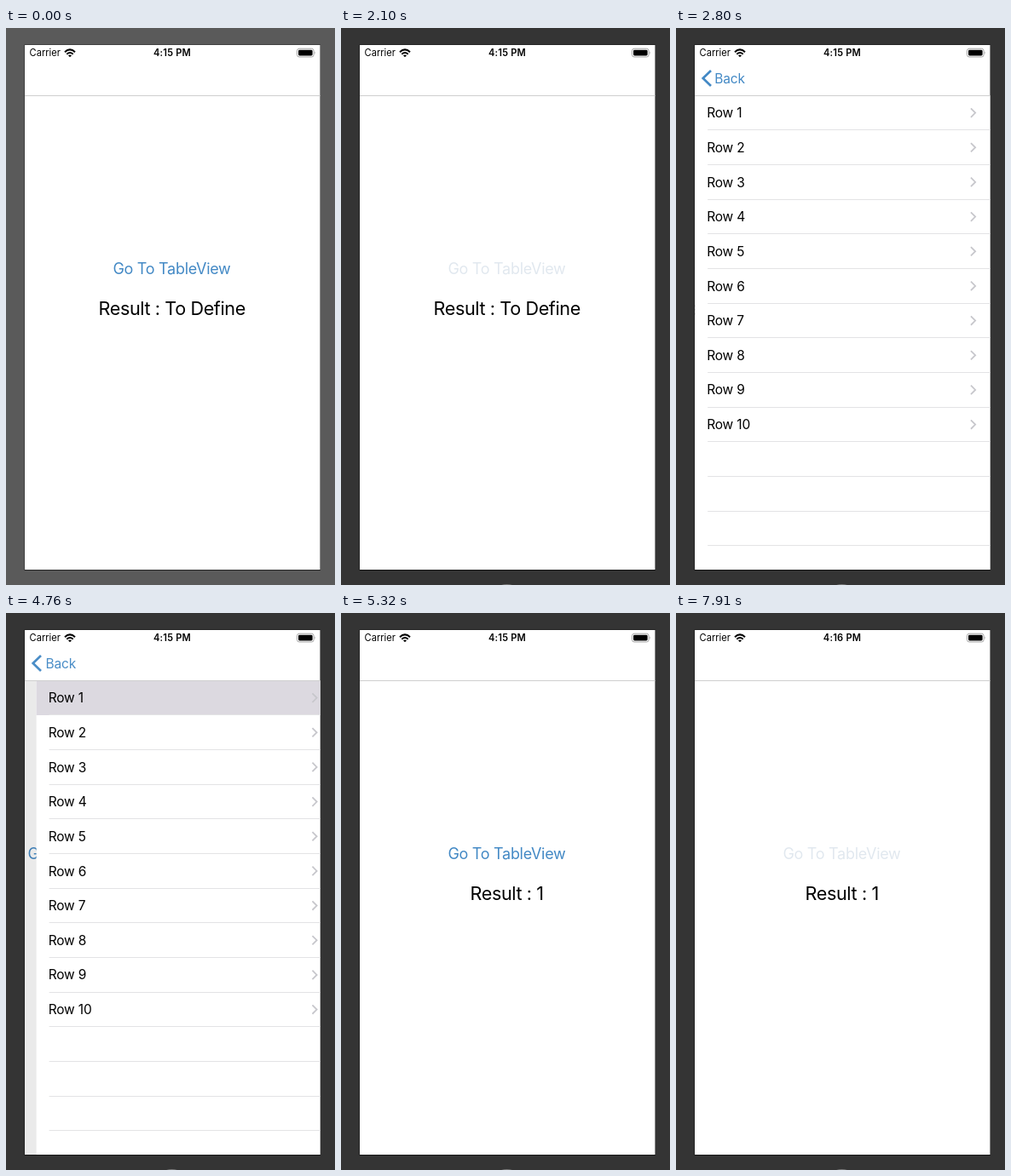
These frames come from a looping animation (386 px wide and 654 px high, 8 s). An HTML page:

```html
<!DOCTYPE html>
<html lang="en">
<head>
<meta charset="utf-8">
<title>Table view navigation</title>
<style>
  html, body { margin: 0; width: 100%; height: 100%; overflow: hidden; }
  svg { display: block; width: 386px; height: 654px; }
  text {
    font-family: Inter, "Open Sans", sans-serif;
    font-optical-sizing: none;
    letter-spacing: -.01em;
  }
  .status { font-size: 11.1px; letter-spacing: 0; }
  .clock { font-weight: 600; letter-spacing: .02em; }
  .cell { font-size: 15.5px; }
  .blue { fill: #4389c5; }
  .go { font-size: 18px; letter-spacing: -.016em; }
  .result { font-size: 21.6px; letter-spacing: -.018em; }
  .line { fill: none; stroke-linecap: butt; }
  .middle { text-anchor: middle; }
</style>
</head>
<body>
<svg viewBox="0 0 386 654">
  <defs>
    <clipPath id="content"><rect x="22" y="79.5" width="346.5" height="556.5"/></clipPath>
  </defs>

  <rect id="bezel" width="386" height="654"/>
  <ellipse id="homeButton" cx="194.5" cy="656" rx="9" ry="3" fill="#777"/>
  <rect x="21.5" y="19.5" width="347.5" height="617.5" fill="#000" opacity=".55"/>
  <rect x="22" y="20" width="346.5" height="616" fill="#fff"/>

  <g clip-path="url(#content)">
    <g id="home">
      <text id="go" class="go middle" x="194.5" y="289">Go To TableView</text>
      <text id="result" class="result middle" x="194.7" y="336.6"></text>
    </g>
    <rect id="dim" x="22" y="79" width="347" height="557"/>
    <g id="table">
      <rect x="22" y="79" width="347" height="557" fill="#fff"/>
      <rect id="selection" x="22" y="79" width="347" height="41" fill="#dcd9e0"/>
    </g>
  </g>

  <rect x="22" y="79" width="346.5" height="1" fill="#cfcfcf"/>
  <g id="back">
    <path class="line" d="M41 50 L31.7 59 L41 68" stroke="#4389c5" stroke-width="2.7"/>
    <text id="backLabel" class="cell blue" x="45.3" y="64.6">Back</text>
  </g>

  <text class="status" x="27.6" y="33.4">Carrier</text>
  <g class="line" stroke="#000" stroke-width="2">
    <path d="M69 28.2 Q75 22.6 81 28.2"/>
    <path d="M71.3 30.7 Q75 27.4 78.7 30.7"/>
  </g>
  <path d="M73 32.2 Q75 30.6 77 32.2 L75 34.3 Z"/>
  <text id="clock" class="status clock middle" x="195" y="33.4"></text>
  <rect x="341.5" y="24.2" width="19.6" height="9.8" rx="2.6" fill="none" stroke="#a5a5a5"/>
  <rect x="343" y="25.7" width="16.6" height="6.8" rx="1.4"/>
  <path d="M362.2 27.5 Q363.8 29.1 362.2 30.7 Z" fill="#a5a5a5"/>
</svg>

<script>
const LOOP = 8000, STEP = 70;
const PRESS = 2100, PUSH = 2249, POP = 4743, NEW_MINUTE = 6650, SECOND_PRESS = 7910;
const WIDTH = 347, TOP = 79.3, ROW_HEIGHT = 40.66;

const el = id => document.getElementById(id);
const set = (id, name, value) => el(id).setAttribute(name, value);
const shift = (id, x) => set(id, "transform", `translate(${x.toFixed(2)} 0)`);

// Ten labelled rows, then empty ones down to the bottom edge
let rows = "";
for (let i = 0; i < 13; i++) {
  const y = TOP + i * ROW_HEIGHT, middle = y + 20.3;
  rows += `<rect x="37" y="${Math.round(y + ROW_HEIGHT - .5)}" width="332" height="1" fill="#e3e3e5"/>`;
  if (i < 10) {
    rows += `<text class="cell" x="36" y="${middle + 5.6}">Row ${i + 1}</text>
      <path class="line" d="M345.8 ${middle - 5.2} l5.2 5.2 l-5.2 5.2" stroke="#c7c7cc" stroke-width="1.8"/>`;
  }
}
el("table").insertAdjacentHTML("beforeend", rows);

// Critically damped spring from 0 to 1
function spring(ms) {
  const x = Math.max(0, ms) * .01826;
  return 1 - (1 + x) * Math.exp(-x);
}

function buttonAlpha(t) {
  if (t >= SECOND_PRESS) return 0;
  if (t < PRESS || t >= PUSH + 250) return 1;
  return Math.max(0, (t - PUSH) / 250);
}

function mix(from, to, k) {
  return `rgb(${from.map((c, i) => Math.round(c + (to[i] - c) * k))})`;
}

function draw(t) {
  const pushed = t < POP ? spring(t - PUSH) : 1 - spring(t - POP);
  const away = 1 - pushed;

  set("bezel", "fill", t < PRESS ? "#5a5a5a" : "#343434");
  set("homeButton", "opacity", t < PRESS ? 0 : 1);
  set("go", "fill", mix([225, 232, 239], [67, 137, 197], buttonAlpha(t)));
  el("result").textContent = t < POP ? "Result : To Define" : "Result : 1";
  el("clock").textContent = t < NEW_MINUTE ? "4:15 PM" : "4:16 PM";

  shift("home", -.3 * WIDTH * pushed);
  shift("table", WIDTH * away);
  set("dim", "opacity", .085 * pushed);
  set("selection", "opacity", t < POP ? 0 : 1);
  set("back", "opacity", pushed);
  shift("backLabel", 32 * away);
}

function frame() {
  const t = performance.now() % LOOP;
  draw(Math.floor(t / STEP) * STEP);
  requestAnimationFrame(frame);
}
frame();
</script>
</body>
</html>
```
